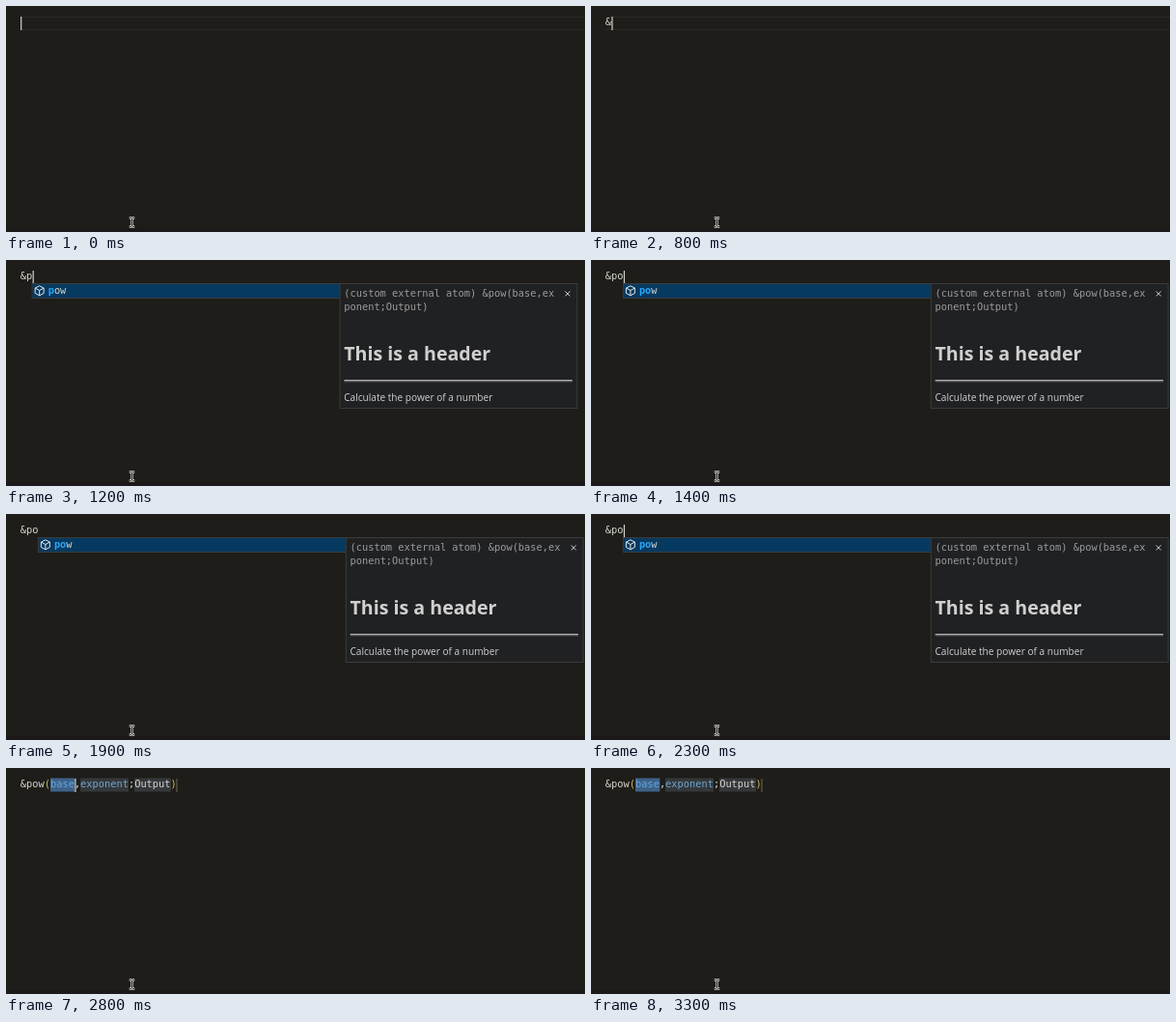
Write an HTML page that moves like this. It is 600 by 234 pixels and loops after 3.4 s.

```html
<!DOCTYPE html>
<html lang="en">
<head>
<meta charset="utf-8">
<title>Autocomplete</title>
<style>
  html, body { margin: 0; width: 100%; height: 100%; overflow: hidden; background: #1e1d19; }
  svg { display: block; }
  .mono { font: 10.35px "DejaVu Sans Mono", monospace; fill: #d6d6d0; }
  .doc { font: 10.1px "Open Sans", "Noto Sans", sans-serif; fill: #d0d0d0; }
  .bold { font-size: 9.7px; font-weight: 700; }
  .head { font-size: 19.6px; font-weight: 700; }
  .dim { fill: #9c9c9c; }
  .match { fill: #2aa5f5; font-weight: 700; }
  .box { fill: #202123; stroke: #3b3c3d; }
  .yellow { fill: #d2bd4e; }
  .blue { fill: #6ea6d2; }
  .sel { fill: #64a7df; }
</style>
</head>
<body>
<svg id="stage" width="600" height="234" viewBox="0 0 600 234">
  <rect width="600" height="234" fill="#1e1d19"/>
  <rect y="230" width="600" height="4" fill="#1b1919"/>
  <path id="line" d="M15 11.5H600M15 24.5H600" stroke="#2a2925"/>
  <g id="slots">
    <rect x="46" y="10.5" width="25.4" height="14" fill="#3e6288"/>
    <rect x="77" y="10.5" width="50" height="14" fill="#35383a"/>
    <rect x="133" y="10.5" width="38" height="14" fill="#35383a"/>
    <rect x="176.5" y="11" width="1" height="14" fill="#6c6a56"/>
  </g>
  <text id="code" class="mono" x="14.8" y="20.3"></text>
  <rect id="caret" y="11" width="1.2" height="14" fill="#d2d2cc"/>
  <g id="all"></g>
  <g id="one"></g>
  <g fill="none">
    <path d="M127.8 219.5H129.5L130.5 220.5L131.5 219.5H133.2M130.5 220.5V227.5M127.8 228.5H129.5L130.5 227.5L131.5 228.5H133.2" stroke="#d4d4d0" stroke-width="2.4"/>
    <path d="M128.2 219.5H129.5L130.5 220.5L131.5 219.5H132.8M130.5 220.5V227.5M128.2 228.5H129.5L130.5 227.5L131.5 228.5H132.8" stroke="#22221f" stroke-width=".9"/>
  </g>
</svg>
<script>
const $ = id => document.getElementById(id);
const CHAR = 6.25, ROW = 14.09, LOOP = 3400;

const text = (cls, x, y, s) => `<text class="${cls}" x="${x}" y="${y}">${s}</text>`;
const rect = (x, y, w, h, attrs) => `<rect x="${x}" y="${y}" width="${w}" height="${h}" ${attrs}/>`;

const cube = (y, color) =>
  `<path transform="translate(28.4 ${y})" fill="none" stroke="${color}" stroke-width="1"
    d="M0 -5L4.5 -2.7V2.6L0 5L-4.5 2.6V-2.7ZM-4.5 -2.7L0 -.3L4.5 -2.7M0 -.3V5"/>`;

const rule = (y, solid) => solid
  ? rect(344.2, y - .8, 236.4, 1.5, 'fill="#d9d9d9"')
  : rect(344.2, y - 1, 236.4, 1, 'fill="#b4b4b4"') + rect(344.2, y + .4, 236.4, .8, 'fill="#8c8c8c"');

const list = height =>
  rect(20.9, 24.5, 318.9, height, 'class="box"') +
  rect(21.4, 25, 317.9, 13.9, 'fill="#063a61"');

const panel = height =>
  rect(339.8, 24.5, 245.8, height, 'class="box"') +
  '<path d="M573.2 32.4L578.2 37.4M578.2 32.4L573.2 37.4" stroke="#cfcfcf"/>';

const names = ["abs", "append", "append_str", "delete", "delete_r", "delNth",
  "flatten", "head", "insLast", "insNth", "int", "last"];

$("all").innerHTML = list(171.5) +
  rect(332.3, 25, 7, 73, 'fill="#36373a"') +
  names.map((name, i) =>
    cube(31.8 + i * ROW, i ? "#a678cc" : "#e4e4e4") + text("mono", 37.4, 35 + i * ROW, name)).join("") +
  panel(192.5) +
  text("mono dim", 344, 37.7, "(external atom) &amp;abs(X;Z)") +
  text("doc bold", 344, 64.6, "Behaviour in assignment") +
  text("doc", 344, 88.8, "Assigns the absolute value of X to Z") +
  rule(104.2, true) +
  text("doc bold", 344, 125.2, "Behaviour in comparison") +
  text("doc", 344, 149.5, "True iff Z=|X| holds") +
  rule(164.5) +
  text("doc bold", 344, 185.6, "Constraints") +
  text("doc", 344, 209.7, "X must be an integer");

$("one").innerHTML = list(15) + cube(31.8, "#e4e4e4") +
  text("mono", 37.4, 35, '<tspan class="match" id="hit"></tspan><tspan id="rest"></tspan>') +
  panel(129) +
  text("mono dim", 344, 37.7, "(custom external atom) &amp;pow(base,ex") +
  text("mono dim", 344, 51.8, "ponent;Output)") +
  text("doc head", 344, 104, "This is a header") +
  rule(125) +
  text("doc", 344, 146, "Calculate the power of a number");

const snippet = '&amp;pow<tspan class="yellow">(</tspan><tspan class="sel">base</tspan>,' +
  '<tspan class="blue">exponent</tspan>;Output<tspan class="yellow">)</tspan>';

// [time, code, caret column, view]; each edit restarts the caret blink
const steps = [
  [0, "", 0, "empty"],
  [800, "&amp;", 1, "empty"],
  [900, "&amp;", 1, "all"],
  [1100, "&amp;p", 2, "one"],
  [1300, "&amp;po", 3, "one"],
  [2400, snippet, 9, "slots"]
];

const show = (id, on) => $(id).style.display = on ? "" : "none";
let current;

function apply(step) {
  current = step;
  const [, code, col, view] = step;
  $("code").innerHTML = code;
  $("caret").setAttribute("x", 15.1 + CHAR * col);
  show("line", view === "empty");
  for (const id of ["all", "one", "slots"]) show(id, id === view);
  const typed = Math.max(0, col - 1);
  $("one").setAttribute("transform", `translate(${typed * CHAR})`);
  $("hit").textContent = "pow".slice(0, typed);
  $("rest").textContent = "pow".slice(typed);
}

const start = performance.now();
function draw() {
  const t = (performance.now() - start) % LOOP;
  const step = steps.findLast(s => s[0] <= t) || steps[0];
  if (step !== current) apply(step);
  show("caret", Math.floor((t - step[0]) / 500) % 2 === 0);
  requestAnimationFrame(draw);
}
draw();
</script>
</body>
</html>
```
